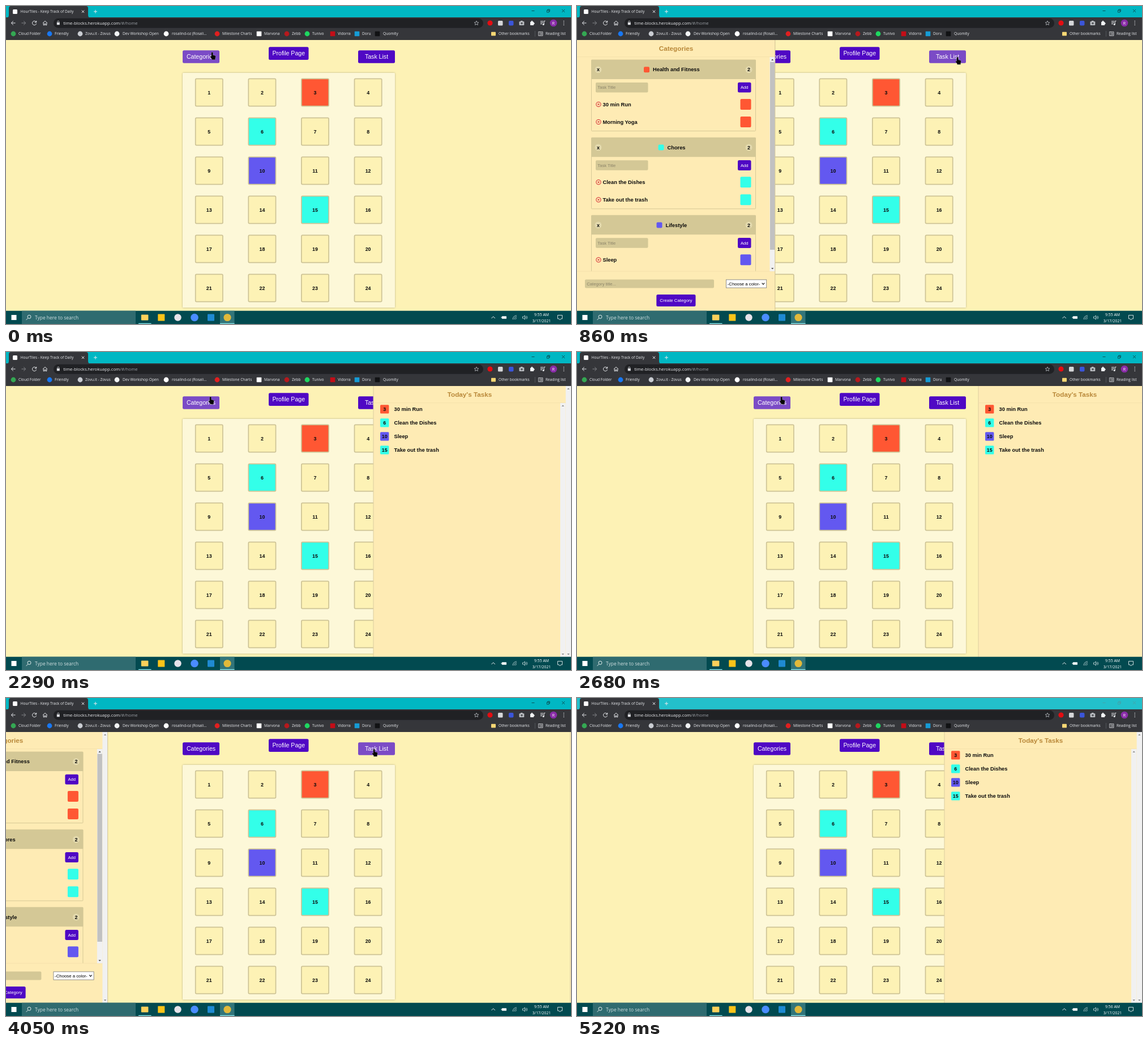
Write an HTML page that moves like this. It is 998 px wide and 561 px high and loops after 5820 ms.

```html
<!DOCTYPE html>
<html lang="en">
<head>
<meta charset="utf-8">
<title>Time planner</title>
<style>
  html, body { margin: 0; width: 100%; height: 100%; overflow: hidden; background: #fdf2b5; }
  svg { display: block; width: 100vw; height: 100vh; }
  text { white-space: pre; }
  .ui { font-family: "Open Sans", "Noto Sans", sans-serif; }
  .web { font-family: "Liberation Sans", Arial, sans-serif; }
  .b { font-weight: bold; }
</style>
</head>
<body>
<svg id="stage" viewBox="0 0 998 561" preserveAspectRatio="none"></svg>
<script>
const LOOP = 5820, SLIDE = 420;
const PURPLE = '#4f08c4', HOVER = '#7b4bc6', PANEL = '#feebb4', TAN = '#d4c896';
const RED = '#ff5733', CYAN = '#33ffe9', BLUE = '#6358f0';

// Drawing helpers
const rect = (x, y, w, h, fill, r = 0, more = '') =>
  `<rect x="${x}" y="${y}" width="${w}" height="${h}" rx="${r}" fill="${fill}" ${more}/>`;
const dot = (x, y, r, fill) => `<circle cx="${x}" cy="${y}" r="${r}" fill="${fill}"/>`;
const line = (d, color = '#e8eaed', w = 1) =>
  `<path d="${d}" fill="none" stroke="${color}" stroke-width="${w}"/>`;
const shape = (d, fill) => `<path d="${d}" fill="${fill}"/>`;
const text = (s, x, y, size, fill, cls = 'web', anchor = 'start', more = '') =>
  `<text x="${x}" y="${y}" font-size="${size}" fill="${fill}" class="${cls}" text-anchor="${anchor}" ${more}>${s}</text>`;
const bold = (s, x, y, size = 9.3, anchor = 'start', fill = '#0c0c0c') =>
  text(s, x, y, size, fill, 'web b', anchor);
const button = (s, x, y, w, h, size, id = '') =>
  rect(x, y, w, h, PURPLE, 2.5, id && `id="${id}"`) +
  text(s, x + w / 2, y + h / 2 + size * .35, size, '#fff', 'web', 'middle');
const arrow = (x, y, dir, color) =>
  shape(`M${x - 2.2} ${y + dir}h4.4l-2.2 ${-2.4 * dir}z`, color);
const track = (x, top, bottom, color) =>
  rect(x, top, 9.5, bottom - top, '#f1f1f1') +
  arrow(x + 4.7, top + 5, 1, color) + arrow(x + 4.7, bottom - 5, -1, color);

function browser() {
  const icons = [
    [13, '#34a853'], [77, '#1877f2'], [131, '#c9ccd1'], [196, '#f1f3f4'], [283, '#ffffff'],
    [373, '#e01f1f'], [447, '#ffffff', 1], [496, '#b5191d'], [532, '#1ed760'],
    [577, '#c30d17', 1], [620, '#169bd5', 1], [656, '#111214', 1]
  ];
  const marks = [
    [22, 'Cloud Folder'], [86, 'Friendly'], [140, 'Zovu.it - Zovus'], [206, 'Dev Workshop Open'],
    [293, 'rosalind-oz (Rosali...'], [382, 'Milestone Charts'], [456, 'Marvona'], [505, 'Zebb'],
    [541, 'Tunivo'], [586, 'Vidorra'], [629, 'Doru'], [666, 'Quomity'],
    [870, 'Other bookmarks'], [953, 'Reading list']
  ];
  const gray = '#bdc1c6';
  return rect(0, 0, 998, 20.5, '#00b7c3', 0, 'id="titlebar"') +
    shape('M2 20.5Q5 20 5 16V4Q5 0 9 0H141Q145 0 145 4V16Q145 20 148 20.5Z', '#35363a') +
    rect(0, 20, 998, 40, '#35363a') +
    rect(12, 6, 8, 8, '#fff', 1.5) +
    text('HourTiles - Keep Track of Daily', 25.5, 12.3, 6.65, '#e8eaed', 'ui') +
    line('M133.8 7.6l4.4 4.4m0-4.4l-4.4 4.4M155 9.8h6m-3-3v6') +
    `<g id="controls">${line('M928.5 8.5h5M982 6l5 5m0-5l-5 5M955.5 7.5h3.6v3.6h-3.6zM956.8 7.4V6h3.6v3.6h-1.3', 'currentColor', .8)}</g>` +
    rect(84, 21.8, 759, 17, '#202124', 8.5) +
    line('M16.5 30H9.5m3.3-3.4L9.3 30l3.5 3.4') +
    line('M27.5 30h7m-3.3-3.4L34.7 30l-3.5 3.4', '#85878b') +
    line('M53.2 28.2a3.6 3.6 0 1 0 .4 2.8M53.7 26v2.9h-3') +
    line('M65 30.2l4-3.7 4 3.7M66.2 29.7v4h1.9v-2.4h1.8v2.4h1.9v-4') +
    rect(89.8, 29, 5, 4.2, '#dfe1e5', .5) + line('M90.8 29v-1.2a1.5 1.5 0 0 1 3 0V29', '#dfe1e5', .8) +
    text('time-blocks.herokuapp.com<tspan fill="#9aa0a6">/#/home</tspan>', 101.3, 33, 7.7, '#e8eaed', 'ui') +
    line('M831 26.3l1.1 2.5 2.7.2-2 1.8.6 2.7-2.4-1.4-2.4 1.4.6-2.7-2-1.8 2.7-.2z', gray, .8) +
    dot(855, 30, 4.6, '#e40d12') +
    rect(869, 26, 8.5, 8.5, '#d5d6d8', 1.5) +
    rect(888, 26, 8.5, 8.5, '#3b55d9', 2) +
    rect(906.5, 27.3, 8.8, 6.7, '#b9bcc0', 1) + rect(909, 26, 3.6, 2, '#b9bcc0') + dot(911, 30.6, 1.8, '#55575b') +
    rect(926, 27.8, 6.2, 6.2, '#f1f3f4', .8) + dot(929, 27.4, 1.4, '#f1f3f4') + dot(932.3, 30.8, 1.4, '#f1f3f4') +
    line('M944 27h5m-5 2.3h5m-5 2.3h3M950.3 32.5v-6h2.2') + dot(949.2, 32.6, 1.5, '#e8eaed') +
    dot(967, 30, 6.3, '#8a2ca8') + text('R', 967, 32.5, 7, '#fff', 'ui', 'middle') +
    [26.7, 30, 33.3].map(y => dot(985.3, y, .8, '#e8eaed')).join('') +
    icons.map(([x, c, sq]) => sq ? rect(x - 4.3, 44.7, 8.6, 8.6, c, .8) : dot(x, 49, 4.4, c)).join('') +
    marks.map(([x, s]) => text(s, x, 51.4, 6.65, '#e8eaed', 'ui')).join('') +
    rect(857, 45.8, 8, 6.8, '#f7d774', .8) + line('M934.5 44v10', '#5f6368', .7) +
    line('M940.5 45.5h7.5v7h-7.5zM943 45.5v7M944.3 47.5h3m-3 1.6h3m-3 1.6h3', '#e8eaed', .7);
}

function board() {
  const fills = { 3: RED, 6: CYAN, 10: BLUE, 15: CYAN };
  let out = rect(0, 60, 998, 478, '#fdf2b5') +
    rect(312, 118, 375, 414, '#fdf8d8', 1.5, 'filter="url(#shadow)"');
  for (let i = 0; i < 24; i++) {
    const x = 358.8 + 93.6 * (i % 4), y = 152.5 + 69 * Math.floor(i / 4);
    out += rect(x - 24.1, y - 24.1, 48.2, 48.2, fills[i + 1] || '#fdf2b5', 1.8, 'stroke="#cdc395" stroke-width="1.7"') +
      bold(i + 1, x, y + 3, 8.9, 'middle');
  }
  return out + button('Categories', 312, 78.3, 65, 22.4, 10.6, 'btnCat') +
    button('Profile Page', 464, 72.3, 70.5, 22.6, 10.6) +
    button('Task List', 622, 78.3, 65, 22.4, 10.6, 'btnTask');
}

const field = (s, x, y, w, h) =>
  rect(x, y, w, h, TAN, 2) + text(s, x + 3.3, y + h / 2 + 2.7, 7.7, '#8c8468');

function card(y, end, title, titleX, color, tasks) {
  const badge = (s, x) => dot(x, y + 17.2, 6, '#e3d9ad') + bold(s, x, y + 20.3, 9, 'middle');
  let out = rect(25.5, y, end - 25.5, 125.5, PANEL, 1, 'stroke="#cdc090" stroke-width=".8"') +
    rect(25.2, y, end - 24.8, 34, TAN, 1) + badge('x', 37.5) + badge('2', end - 12) +
    rect(titleX - 16, y + 12.2, 10, 10, color, 2) + bold(title, titleX, y + 20.4) +
    field('Task Title', 33, y + 40, end - 223, 17.4) +
    button('Add', end - 31.5, y + 39.8, 23.5, 17.8, 7.6);
  tasks.forEach((name, i) => {
    const cy = y + 78.5 + 31 * i;
    out += `<circle cx="38" cy="${cy}" r="4.1" fill="none" stroke="#d3202a" stroke-width="1"/>` +
      line(`M36.4 ${cy - 1.6}l3.2 3.2m0-3.2l-3.2 3.2`, '#d3202a', 1) +
      bold(name, 45.5, cy + 3.2) + rect(end - 27, cy - 9.5, 19, 19, color, 2);
  });
  return out;
}

// inset: room taken by the outer scrollbar
function categories(inset) {
  const right = 350 - inset, mid = right / 2, end = right - 34.5, half = inset / 2;
  return rect(0, 60, 350, 478, PANEL) +
    bold('Categories', mid, 78.5, 11.7, 'middle', '#b98839') +
    line(`M0 89.7H${right}`, '#f3dfaa', .8) +
    card(95, end, 'Health and Fitness', 134 - half, RED, ['30 min Run', 'Morning Yoga']) +
    card(232.3, end, 'Chores', 159.5 - half, CYAN, ['Clean the Dishes', 'Take out the trash']) +
    card(369.3, end, 'Lifestyle', 156.5 - half, BLUE, ['Sleep']) +
    rect(0, 468, right, 70, PANEL) + line(`M0 468H${right}`, '#f3dfaa', .8) +
    track(right - 9.5, 90, 468, '#505050') + rect(right - 9, 98.5, 8.5, 331.5, '#c1c1c1') +
    field('Category title...', 14, 482.5, right - 122, 15) +
    rect(right - 86.5, 482.9, 71.2, 14.2, '#fff', 0, 'stroke="#767676" stroke-width=".8"') +
    text('-Choose a color-', right - 84.3, 492.9, 7.8, '#000') +
    line(`M${right - 23.3} 488.7l2.3 2.4 2.3-2.4`, '#111', 1.1) +
    button('Create Category', mid - 34.7, 509, 69.2, 21, 7.8) +
    (inset ? track(340.5, 60, 538, '#8a8a8a') : '') +
    rect(349.3, 60, 1, 478, '#cfc193');
}

function tasks() {
  const rows = [[3, RED, '30 min Run'], [6, CYAN, 'Clean the Dishes'], [10, BLUE, 'Sleep'], [15, CYAN, 'Take out the trash']];
  return rect(0, 60, 352, 478, PANEL) + rect(-.5, 60, 1, 478, '#dccda0') +
    bold("Today's Tasks", 170, 78.5, 11.7, 'middle', '#b98839') +
    line('M0 89.7H340', '#f3dfaa', .8) +
    rows.map(([n, c, s], i) => rect(12, 93.2 + 24 * i, 15.4, 15.4, c, 1.5) +
      bold(n, 19.7, 104.1 + 24 * i, 8.9, 'middle') + bold(s, 36.5, 104.2 + 24 * i)).join('') +
    track(330, 90, 538, '#8a8a8a') + track(339.7, 60, 538, '#8a8a8a');
}

function taskbar() {
  const clock = (s, y, id) => text(s, 946, y, 6.9, '#fff', 'ui', 'middle', id);
  return rect(0, 537.7, 998, 24, '#024a50') + rect(28, 537.7, 201, 24, '#2f6b70') +
    rect(9.5, 545, 9, 9, '#fff') +
    `<circle cx="41" cy="548.3" r="3" fill="none" stroke="#e3eded"/>` + line('M38.8 550.6l-3.2 3.3', '#e3eded') +
    text('Type here to search', 51, 553, 8.45, '#d0dfe0', 'ui') +
    rect(378, 537.7, 25.5, 24, '#32757a') +
    rect(234, 559.6, 22.5, 1.4, '#7fdde3') + rect(378, 559.6, 25.5, 1.4, '#7fdde3') +
    rect(238.8, 544.5, 12.6, 10, '#fbd15b', 1) + rect(268.3, 543.5, 12, 12, '#fcc419', .5) +
    dot(303.5, 549.5, 6.2, '#e6e3ea') + dot(333, 549.5, 6.8, '#4a8cff') +
    rect(356, 543.5, 12, 12, '#1f8ad2', 1) + dot(391, 549.5, 6.6, '#e2b93a') +
    line('M857.5 551l3.2-3.2 3.2 3.2', '#fff', .9) +
    rect(876, 547.3, 8, 4.4, '#fff', .5) + rect(874.6, 548.5, 1.2, 2, '#fff') +
    line('M895 553a7 7 0 0 1 7-7M897.4 553a4.6 4.6 0 0 1 4.6-4.6M899.8 553a2.2 2.2 0 0 1 2.2-2.2', '#b8cfd1', .9) +
    line('M912.5 548v3h1.7l2.3 2v-7l-2.3 2zM918 547.8q1.4 1.7 0 3.4M919.6 546.6q2.3 2.9 0 5.8', '#d5e3e4', .8) +
    clock('9:55 AM', 547, 'id="clock"') + clock('3/17/2021', 557.6, '') +
    line('M974.5 545.5h8v6.3h-2.5l-1.5 2-1.5-2h-2.5z', '#fff', .8);
}

const hand = 'M0 0C1.4-.2 1.7.6 1.7 1.5V5L5 5.8Q6.6 6.2 6.4 8L5.7 11V13.2H-.6V11.8L-3.2 8.2Q-3.6 7 -2.5 6.8L-1.3 7.6V1.2Q-1.2.1 0 0Z';
const pointer = 'M0 0V10.4L2.4 8.2 4 11.9 5.7 11.2 4.1 7.6H7.3Z';

document.getElementById('stage').innerHTML =
  '<defs><filter id="shadow" x="-5%" y="-5%" width="110%" height="110%">' +
  '<feDropShadow dx="0" dy="0" stdDeviation="1.8" flood-opacity=".3"/></filter></defs>' +
  board() +
  `<g id="catWide">${categories(0)}</g><g id="catNarrow">${categories(9.5)}</g><g id="tasks">${tasks()}</g>` +
  browser() + taskbar() +
  '<path id="cursor" fill="#050505" stroke="#fff" stroke-opacity=".55" stroke-width=".4"/>';

const el = id => document.getElementById(id);
const set = (id, name, value) => el(id).setAttribute(name, value);

const ticks = [0];
[[200, 400, 3], [490, 770, 4], [860, 1340, 6], [1430, 1430, 1], [1540, 1800, 4], [2000, 2290, 4],
 [2590, 3160, 7], [3250, 3250, 1], [3750, 3860, 2], [4050, 4340, 4], [4440, 4550, 2],
 [5030, 5030, 1], [5220, 5220, 1]].forEach(([a, b, n]) => {
  for (let i = 0; i < n; i++) ticks.push(Math.round(a + (n > 1 ? (b - a) * i / (n - 1) : 0)));
});

// cubic-bezier(.25, .1, .25, 1)
function ease(p) {
  if (p <= 0) return 0;
  if (p >= 1) return 1;
  const curve = (s, a, b) => 3 * (1 - s) ** 2 * s * a + 3 * (1 - s) * s * s * b + s ** 3;
  let lo = 0, hi = 1;
  for (let i = 0; i < 24; i++) {
    const s = (lo + hi) / 2;
    if (curve(s, .25, .25) < p) lo = s; else hi = s;
  }
  return curve(lo, .1, 1);
}

// Each toggle time flips a panel, starting closed
function panel(toggles, t) {
  const n = toggles.filter(a => a <= t).length;
  if (!n) return { open: 0, closing: false };
  const v = ease((t - toggles[n - 1]) / SLIDE);
  return n % 2 ? { open: v, closing: false } : { open: 1 - v, closing: true };
}

const path = [
  [0, 364, 81.5], [590, 364, 81.5], [680, 560, 120], [770, 700, 100], [860, 672, 90], [950, 659, 83.5],
  [1430, 659, 83.5], [1540, 640, 84], [1800, 415, 76], [2000, 385, 77], [2290, 361, 79],
  [2970, 361, 79], [3060, 520, 90], [3160, 648, 92], [3250, 645, 101.5], [3700, 645, 101.5],
  [3750, 646, 96], [3860, 650, 90], [4050, 650, 90], [4340, 1010, 120], [LOOP, 1010, 120]
];
function cursorAt(t) {
  const i = path.findIndex(k => k[0] > t), [a, x, y] = path[i - 1], [b, u, v] = path[i];
  const p = (t - a) / (b - a);
  return [x + (u - x) * p, y + (v - y) * p];
}

function draw(now) {
  const t = ticks.filter(a => a <= now).pop();
  const cat = panel([155, 1143, 2600, 3930], t);
  const task = panel([1217, 2530, 4042], t);
  const catX = -351 * (1 - cat.open), taskX = 649 + 351 * (1 - task.open);
  set('catWide', 'transform', `translate(${cat.closing ? -400 : catX})`);
  set('catNarrow', 'transform', `translate(${cat.closing ? catX : -400})`);
  set('tasks', 'transform', `translate(${taskX})`);

  const [x, y] = cursorAt(t);
  const row = y > 78 && y < 101 && x < taskX;
  const onCat = row && x > 312 && x < 377 && x > catX + 350;
  const onTask = row && x > 622 && x < 687;
  set('btnCat', 'fill', onCat ? HOVER : PURPLE);
  set('btnTask', 'fill', onTask ? HOVER : PURPLE);
  set('cursor', 'd', onCat || onTask ? hand : pointer);
  set('cursor', 'transform', `translate(${x} ${y})`);

  const blurred = t >= 5030;
  set('titlebar', 'fill', blurred ? '#23c0cb' : '#00b7c3');
  set('controls', 'color', blurred ? '#4b9da3' : '#0c3b40');
  el('clock').textContent = t >= 5220 ? '9:56 AM' : '9:55 AM';
}

const start = performance.now();
function loop() {
  draw((performance.now() - start) % LOOP);
  requestAnimationFrame(loop);
}
loop();
</script>
</body>
</html>
```
